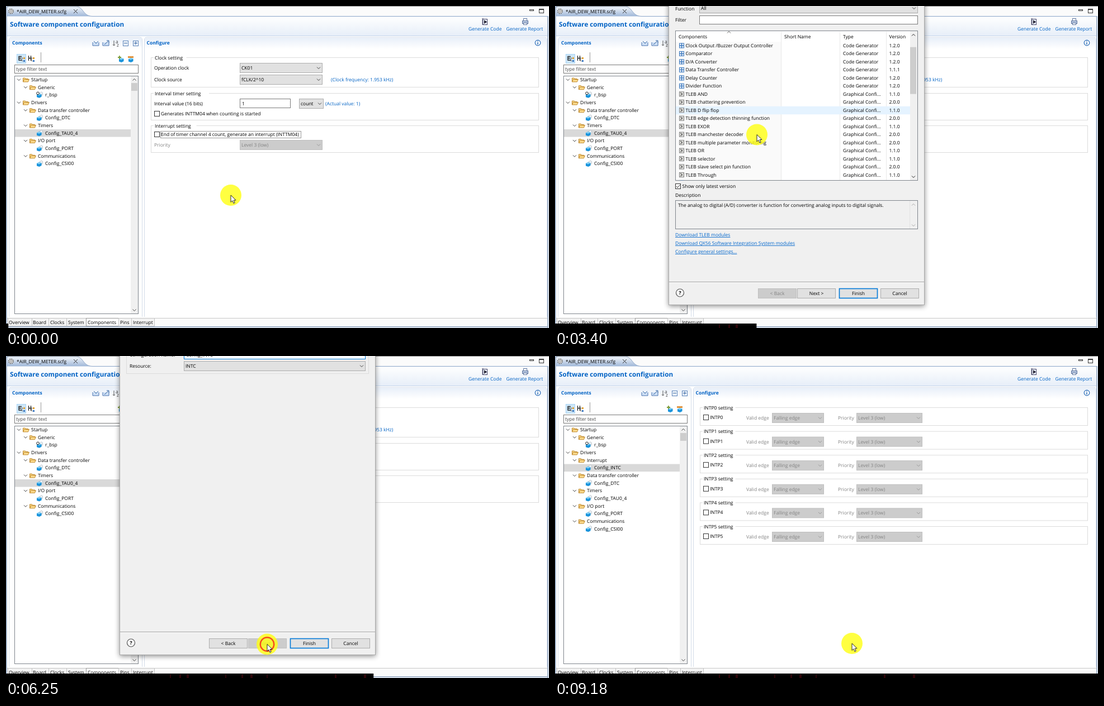
Recreate the animation shown at these times as an HTML page. Size 971 by 577 pixels, loop 9210 ms.

```html
<!DOCTYPE html>
<html lang="en">
<head>
<meta charset="utf-8">
<title>Component configuration</title>
<style>
html, body { margin: 0; width: 100%; height: 100%; overflow: hidden; background: #fff; }
svg { display: block; width: 971px; height: 577px; }
text { font: 8.5px "Open Sans", "Noto Sans", sans-serif; fill: #000; white-space: pre; text-rendering: geometricPrecision; }
.b { font-weight: 700; }
.h { font-size: 11.7px; font-weight: 700; }
.blue { fill: #0062c4; }
.gray { fill: #838383; }
.hint { fill: #444; }
.mid { text-anchor: middle; }
.link { fill: #0066cc; text-decoration: underline; }
.off text { fill: #a0a0a0; }
.shadow { filter: drop-shadow(0 2px 5px rgba(0,0,0,.45)); }
</style>
</head>
<body>
<svg id="stage" viewBox="0 0 971 577" xmlns="http://www.w3.org/2000/svg"></svg>
<script>
const LOOP = 9210, ROW = 14.47, LIST_TOP = 64;

// Drawing helpers. Text takes the middle height of its line.
const T = (x, y, s, c = '') => `<text x="${x}" y="${y + 3}" class="${c}">${s}</text>`;
const R = (x, y, w, h, fill, line, more = '') => {
  const o = line ? .5 : 0;
  return `<rect x="${x + o}" y="${y + o}" width="${w}" height="${h}" fill="${fill}" ${line ? `stroke="${line}"` : ''} ${more}/>`;
};
const P = (d, line, fill = 'none', w = 1) => `<path d="${d}" fill="${fill}" stroke="${line}" stroke-width="${w}"/>`;
const G = (id, s) => `<g id="${id}">${s}</g>`;
const at = (x, y, s) => `<g transform="translate(${x} ${y})">${s}</g>`;
const down = (x, y, c = '#444') => P(`M${x - 3} ${y - 1.5}l3 3 3-3`, c);
const up = (x, y, c = '#444') => P(`M${x - 3} ${y + 1.5}l3-3 3 3`, c);
const combo = (x, y, w, s, off) =>
  R(x, y - 9, w, 17, off ? '#ccc' : '#e1e1e1', off ? '#bfbfbf' : '#adadad') +
  T(x + 3, y, s, off ? 'gray' : '') + down(x + w - 6, y, off ? '#999' : '#444');
const check = (y, s) => R(265, y - 5, 9, 9, '#fff', '#333') + T(277, y, s);
const group = (y, h, s) =>
  R(259, y, 693, h, 'none', '#dcdcdc') + R(264, y - 3, s.length * 4.5, 7, '#fff') + T(266, y + .5, s);

// Small icons
const folder = P('M.5 8.5v-7h4l1 1.5h4v2M.5 8.5l2-4.5h9l-2 4.5z', '#b98328', '#fbd98a', .9);
const box = P('M0 5l4-2 4.500 1.500v4.500l-4 2-4.500-1.500z', 'none', '#1a94dc') + P('M0 5l4-2 4.500 1.500-4.500 2z', 'none', '#86d2f7');
const cube = P('M4 3l4.500-3 2 1.500v4l-2 1.500V4.500z', '#a9b4bc', '#eef2f5', .7) + box;
const squares = c => R(0, 0, 8, 8, '#e8eef8', c) + P('M4.5 0v9M0 4.5h9', c, 'none', 1.4);
const sheet = R(0, 0, 8, 8, '#f4f4f0', '#777') + P('M2 2.5h2v4h-2M7 2.5l-2 2 2 2', '#333');
const icons = { g: squares('#3b78bd'), m: squares('#c9772c'), e: sheet };
const plusBox = (x, plus) => R(x, 62, 9, 9, '#f5f9ff', '#5b83b8') + P(`M${x + 2} 66.500h6${plus ? `M${x + 5} 63.500v6` : ''}`, '#2c5f9e');
const tray = (x, d) => P(`M${x} 65v6h11v-6`, '#4a74b0', '#cfe0f5') + P(d, '#2c5f9e');
const hier = (x, d) => P(d, '#222', 'none', 1.3) + P(`M${x + 6.5} 92v6.500h2M${x + 6.5} 93.500h2`, '#777') +
  R(x + 9, 92, 3, 3, '#e0a030') + R(x + 9, 97, 3, 3, '#3c78c0');

const gradient = (id, a, b) =>
  `<linearGradient id="${id}" x2="0" y2="1"><stop stop-color="${a}"/><stop offset="1" stop-color="${b}"/></linearGradient>`;

function frameWindow() {
  const tabs = [['Overview', 3, 5], ['Board', 46, 48], ['Clocks', 76, 79], ['System', 108, 111],
    ['Components', 143, 146], ['Pins', 201, 204], ['Interrupt', 224, 227]];
  const ends = [...tabs.slice(1).map(t => t[1]), 265];
  return `<defs>${gradient('tab', '#f4f7fb', '#9fb7d8')}${gradient('head', '#fff', '#e6eef8')}${gradient('sect', '#e8eff9', '#fff')}
    <clipPath id="rows"><rect x="216" y="64" width="419" height="248.5"/></clipPath>
    <clipPath id="strip"><rect id="stripBox" y="569" width="4" height="8"/></clipPath></defs>` +
    R(0, 0, 971, 577, '#fff') + R(0, 0, 971, 18, '#fbfbfb') + R(0, 19, 971, 35, 'url(#head)') +
    P('M1 18.5V5q0-4 4-4h120c14 0 12 17.5 30 17.5z', 'none', 'url(#tab)') +
    P('M1 18.5V5q0-4 4-4h120c14 0 12 17.5 30 17.5H970', '#8ba5c8') +
    R(0, 0, 971, 1, '#8c8c8c') + R(0, 0, 2, 577, '#a3b4cb') + R(968, 18, 2, 559, '#a3b4cb') +
    `<circle cx="9" cy="9.5" r="4" fill="#eee" stroke="#777" stroke-width="2" stroke-dasharray="2 1.1"/>
     <circle cx="9" cy="9.5" r="1.6" fill="#fff" stroke="#777"/>` +
    T(19, 10, '*AIR_DEW_METER.scfg') + P('M121 6l7 7M128 6l-7 7', '#333') +
    R(936, 6, 7, 2, '#fff', '#333') + R(953, 5, 8, 7, '#fff', '#333') + R(953, 5, 9, 2, '#333') +
    T(7, 34, 'Software component configuration', 'h blue') +
    R(852, 23, 8, 10, '#eef3fa', '#446') + P('M851 23h3M851 26h3M851 29h3M851 32h3', '#446') + P('M855 25l5 3.5-5 3.5z', 'none', '#223') +
    R(923, 26, 10, 5, '#b4c4de', '#5f769f') + R(925, 22, 6, 4, '#fff', '#5f769f') + R(925, 30, 6, 3, '#fff', '#5f769f') +
    T(827, 41, 'Generate Code', 'blue') + T(894.5, 41, 'Generate Report', 'blue') +
    R(2, 53, 966, 1, '#c3d4ea') +
    [[5, 238], [247, 720]].map(([x, w]) => P(`M${x + .5} 557V60q0-4 4-4h${w - 8}q4 0 4 4V557`, '#d3dce9') +
      R(x + 1, 57, w - 1, 20, 'url(#sect)')).join('') +
    T(11, 66, 'Components', 'b blue') + T(251.5, 66, 'Configure', 'b blue') +
    `<circle cx="951" cy="66" r="4.8" fill="#fff" stroke="#2a6db8" stroke-width="1.2"/>` + P('M951 65v4M951 62.5v1.4', '#2a6db8', 'none', 1.5) +
    tray(155, 'M157 63l4 4 4-4') + tray(173, 'M176 69l7-6M180 62h4v4') +
    P('M193 62v9M191 69l2 2 2-2', '#555') + T(196, 64, 'a', 'hint') + T(198, 70, 'z', 'hint') +
    plusBox(209, false) + plusBox(227, true) +
    R(19, 86, 16, 16, '#cde6f9', '#a9d3f3') + hier(22, 'M28 90.500h-5v6.500h5M23 93.500h4') +
    hier(39, 'M40.500 89v9M40.500 93.500h4M44.500 89v9') + R(62, 83, 1, 18, '#999') +
    G('tools', at(202, 90, box) + P('M200 92h6M203 89v6', '#7d9a35', 'none', 1.8) +
      at(219, 90, box) + R(218, 90, 10, 3, '#e0913a')) +
    R(15, 105, 221, 15, '#fff', '#7a7a7a') + T(18, 113, 'type filter text', 'hint') +
    R(15, 125, 221, 426, '#fff', '#7f858c') + R(223, 126, 13, 425, '#f0f0f0') +
    up(229.5, 132) + down(229.5, 545) + R(224, 138, 11, 14, '#cdcdcd') +
    R(2, 559, 966, 16, '#fafafa') + R(2, 559, 966, 1, '#c8c8c8') +
    tabs.map(([s, x, tx], i) => R(x, 559, ends[i] - x, 14, i == 4 ? '#fff' : '#f3f3f3', i == 4 ? '#999' : '#c4c4c4') + T(tx, 567, s)).join('') +
    R(0, 574, 970, 2, '#a3b4cb');
}

// Marks: v open, > closed, - leaf, * selected leaf; the digit is the depth.
const tree = lines => lines.split('|').map((line, i) => {
  const y = 132 + 13.68 * i, mark = line[0];
  if (mark == '-' || mark == '*') {
    const s = line.slice(1);
    return (mark == '*' ? R(16, y - 6.8, 207, 13.6, '#d9d9d9') : '') + at(55, y - 5.5, cube) +
      (s == 'r_bsp' ? `<circle cx="57" cy="${y - 3}" r="2.3" fill="#fff" stroke="#222"/>` : '') + T(70, y, s);
  }
  const x = 12 * line[1];
  return (mark == 'v' ? down(x + 23, y) : P(`M${x + 22} ${y - 3}l3 3-3 3`, '#888')) +
    at(x + 30, y - 4.5, folder) + T(x + 45, y, line.slice(2));
}).join('');

const HEAD = 'v0Startup|v1Generic|-r_bsp|v0Drivers|';
const trees = [
  'v1Data transfer controller|-Config_DTC|v1Timers|*Config_TAU0_4|v1I/O port|-Config_PORT|v1Communications|-Config_CSI00',
  '>1Interrupt|v1Data transfer controller|*Config_TAU0_4|v1Timers|-Config_PORT|v1I/O port|-Config_CSI00|>1Communications',
  'v1Interrupt|*Config_INTC|v1Data transfer controller|-Config_DTC|v1Timers|-Config_TAU0_4|v1I/O port|-Config_PORT|v1Communications|-Config_CSI00'
];

const timerForm = () =>
  group(92, 53, 'Clock setting') + T(265, 111, 'Operation clock') + combo(418, 111, 147, 'CK01') +
  T(265, 132, 'Clock source') + combo(418, 132, 147, 'fCLK/2^10') + T(581, 132, '(Clock frequency: 1.953 kHz)', 'blue') +
  group(156, 48, 'Interval timer setting') + T(265, 175, 'Interval value (16 bits)') +
  R(418, 166, 90, 16, '#fff', '#7a7a7a') + T(422, 175, '1') + combo(524, 175, 43, 'count') + T(571, 175, '(Actual value: 1)', 'blue') +
  check(193, 'Generates INTTM04 when counting is started') +
  group(214, 48, 'Interrupt setting') + check(230, 'End of timer channel 4 count, generate an interrupt (INTTM04)') +
  R(276, 224, 251, 12, 'none', '#333', 'stroke-dasharray="1 1"') +
  T(265, 249, 'Priority', 'gray') + combo(418, 249, 147, 'Level 3 (low)', true);

const interruptForm = () => [0, 1, 2, 3, 4, 5].map(n => at(0, n * 42.6,
  group(92, 32, `INTP${n} setting`) + check(110, 'INTP' + n) + T(342, 111, 'Valid edge', 'gray') +
  combo(388, 111, 92, 'Falling edge', true) + T(506, 111, 'Priority', 'gray') + combo(539, 111, 117, 'Level 3 (low)', true))).join('');

// name | type | version | short name
const parts = `A/D Converter|g|1.2.0
Board Support Package|m|1.62|r_bsp
Clock Accuracy Check|g|1.1.0
Clock Output /Buzzer Output Controller|g|1.2.0
Comparator|g|1.2.0
D/A Converter|g|1.2.0
Data Transfer Controller|g|1.1.1
Delay Counter|g|1.2.0
Divider Function|g|1.2.0
TLEB AND|e|1.1.0
TLEB chattering prevention|e|2.0.0
TLEB D flip flop|e|1.1.0
TLEB edge detection thinning function|e|2.0.0
TLEB EXOR|e|1.1.0
TLEB manchester decoder|e|2.0.0
TLEB multiple parameter monitoring|e|2.0.0
TLEB OR|e|1.1.0
TLEB selector|e|1.1.0
TLEB slave select pin function|e|2.0.0
TLEB Through|e|1.1.0
External Event Counter|g|1.2.0
TK4021 Sensor Middleware|m|1.00|r_tk4021
TK5037 Sensor Middleware|m|1.10|r_tk5037
TK6000 Sensor Middleware|m|1.00|r_tk6000
VD610x Sensor Middleware|m|1.22|r_vd610x
VD720x Sensor Middleware|m|1.00|r_vd720x
IIC Communication (Master mode)|g|1.3.0
IIC Communication (Slave mode)|g|1.2.0
IIC Communication Driver Interface Mid...|m|1.10|r_comms_i2c
Input Pulse Interval/Period Measurement|g|1.2.0
Input Signal High-/Low-Level Width Me...|g|1.2.0
Interrupt Controller|g|1.2.0
Interval Timer|g|1.2.0
Key Interrupt|g|1.1.1
PJ4608 Sensor Middleware|m|1.01|r_pj4608
Ports|g|1.2.0`.split('\n');
const types = { g: 'Code Generator', e: 'Graphical Confi...', m: 'QX56 Software I...' };

const partRow = (line, i) => {
  const [name, type, version, short = ''] = line.split('|'), y = 71 + ROW * i;
  return at(222, y - 4.5, icons[type]) + T(233.5, y, name) + T(410, y, short) + T(515, y, types[type]) + T(597.5, y, version);
};

const button = (id, x, s) => G(id, R(x, 506, 68, 17, '#e1e1e1', '#adadad') + T(x + 34.5, 515, s, 'mid'));

const listPage = () =>
  T(215, 5, 'Function') + combo(258, 4, 390, 'All') + T(215, 25, 'Filter') + R(258, 17, 390, 15, '#fff', '#7a7a7a') +
  R(215, 44, 433, 268, '#fff', '#7f858c') + R(216, 64, 188, 248, '#fafafa') +
  [404, 509, 592].map(x => R(x, 46, 1, 266, '#e8e8e8')).join('') + up(311, 47, '#555') +
  T(221, 55, 'Components') + T(410, 55, 'Short Name') + T(515, 55, 'Type') + T(597.5, 55, 'Version') +
  `<g clip-path="url(#rows)"><g id="list">${R(216, 0, 419, ROW, '#d9d9d9', '', 'id="picked"')}${R(216, 0, 419, ROW, '#e5f3ff', '', 'id="hover"')}${parts.map(partRow).join('')}</g></g>` +
  R(635, 45, 13, 267, '#f0f0f0') + up(641, 52, '#222') + down(641, 306, '#222') + R(635, 58, 11, 84, '#cdcdcd', '', 'id="thumb"') +
  R(215, 318, 9, 9, '#fff', '#333') + P('M217 323l2 2.500 4.500-5', '#222') + T(227.5, 323, 'Show only latest version') +
  T(215, 339, 'Description') + R(215, 348, 433, 51, '#f0f0f0', '#7f858c') + R(634, 349, 1, 50, '#e2e2e2') +
  up(641, 356, '#aaa') + down(641, 393, '#aaa') +
  G('aboutA', T(220, 357, 'The analog to digital (A/D) converter is function for converting analog inputs to digital signals.')) +
  G('aboutB', T(220, 357, 'The interrupt controller is function for handling interrupt requests from pins.')) +
  T(215, 410, 'Download TLEB modules', 'link') + T(215, 425, 'Download QX56 Software Integration System modules', 'link') +
  T(215, 440, 'Configure general settings...', 'link');

const namePage = () =>
  R(215, -20, 433, 51, 'none', '#dcdcdc') + T(221, -2, 'Configuration name:') +
  R(318, -12, 324, 17, '#fff', '#0078d7', 'id="nameBox"') + T(322, -2, 'Config_INTC') +
  T(221, 18, 'Resource:');

const dialog = () =>
  R(203, -20, 457, 555, '#f0f0f0', '#a8a8a8', 'class="shadow"') + G('pageA', listPage()) +
  G('pageB', G('labels', namePage()) + combo(318, 18, 324, 'INTC')) +
  R(204, 494, 456, 1, '#a0a0a0') + R(204, 495, 456, 1, '#fff') +
  `<circle cx="223.500" cy="514" r="7" fill="#f6f6f6" stroke="#555" stroke-width="1.2"/>` + T(223.5, 514, '?', 'b mid') +
  button('back', 363, '&lt; Back') + button('next', 433, 'Next &gt;') + button('finish', 508, 'Finish') + button('cancel', 582, 'Cancel');

const pointer =
  G('halo', `<circle r="19" fill="#ffff12" fill-opacity=".8"/>`) +
  G('ring', `<circle r="12.2" fill="none" stroke="#f8491c" stroke-width="2.500"/>`) +
  G('arrow', P('M0 0v12.500l2.900-2.700 2 4.700 2.200-.9-2-4.600h4z', '#111', '#fff', .9)) +
  G('hand', P('M-1.500 0q1.500-1.800 3 0v5l6 1.200q1.200.4 1 2l-1 4.300v2.500h-6.500v-2l-4.500-5q.3-1.800 2-1z', '#111', '#fff', .9) +
    P('M3.500 5.500v3M6 6v2.500', '#111', 'none', .7));

const strip = `<g clip-path="url(#strip)">${R(0, 569, 971, 8, '#000')}` +
  [293, 310, 323, 392, 421, 437, 466, 588, 640].map((x, i) => R(x, 570, 2 + i % 3, 7, '#2e0308')).join('') + '</g>';

document.getElementById('stage').innerHTML = frameWindow() +
  trees.map((s, i) => G('tree' + i, tree(HEAD + s))).join('') +
  G('formA', timerForm()) + G('formB', interruptForm()) + G('dialog', dialog()) + strip + pointer;

const el = id => document.getElementById(id);
const show = (id, on) => { el(id).style.display = on ? '' : 'none'; };
const within = (t, a, b) => t >= a && t < b;
const place = (id, [x, y]) => el(id).setAttribute('transform', `translate(${x} ${y})`);
const paint = (id, fill, line, w = 1) => {
  const r = el(id).firstChild;
  r.setAttribute('fill', fill);
  r.setAttribute('stroke', line);
  r.setAttribute('stroke-width', w);
};

const path = [[0, 402, 339], [200, 402, 339], [1300, 206, 95], [2500, 206, 95], [2860, 222, 108], [3260, 361, 230.5],
  [4300, 361, 230.5], [4560, 336, 300], [4720, 310, 268], [4820, 301, 259], [5150, 301, 259], [5650, 467, 516.5],
  [6500, 467, 516.5], [7150, 546.5, 518.5], [7750, 546.5, 518.5], [8400, 531, 515], [LOOP, 531, 515]];
const clicks = [[1340, 1510], [4960, 5130], [6080, 6400], [7400, 7720]];
const wheel = [3340, 3540, 3700, 3900, 4060, 4220];

function pos(t) {
  t = Math.max(t, 0);
  const i = path.findIndex(p => p[0] > t), [t0, x0, y0] = path[i - 1], [t1, x1, y1] = path[i];
  const u = (t - t0) / (t1 - t0), k = u * u * (3 - 2 * u);
  return [x0 + (x1 - x0) * k, y0 + (y1 - y0) * k];
}
const scroll = t => 3 * wheel.filter(w => w <= t).length;

const marks = [0, 40, 970, 1930, 2890, 3840, 4770, 5710, 6680, 7630, 8580, 9180, LOOP];
const steps = [0, 1, 24, 48, 72, 95, 118, 141, 165, 189, 213, 228, 229];
function progress(t) {
  t = Math.min(t + 22, LOOP - 1);
  const i = marks.findIndex(m => m > t), u = (t - marks[i - 1]) / (marks[i] - marks[i - 1]);
  return (Math.floor(steps[i - 1] + u * (steps[i] - steps[i - 1])) + 1) / 229;
}

function draw(t) {
  const tip = pos(t);
  el('stripBox').setAttribute('width', 971 * progress(t));
  place('arrow', tip);
  place('hand', tip);
  place('halo', pos(t - 40));
  place('ring', tip);
  const hand = within(t, 1150, 2600);
  show('hand', hand);
  show('arrow', !hand);
  show('ring', clicks.some(c => within(t, ...c)));

  el('tools').style.opacity = within(t, 1500, 2200) ? .35 : 1;
  show('tree0', t < 7500);
  show('tree1', within(t, 7500, 7750));
  show('tree2', t >= 7750);
  show('formA', t < 8100);
  show('formB', t >= 8100);

  show('dialog', within(t, 2200, 7950));
  el('dialog').style.opacity = Math.min(1, Math.max(0, (t - 2200) / 150));
  const second = t >= 6200, picked = t >= 4980, done = t >= 7450;
  show('pageA', !second);
  show('pageB', second);
  show('aboutA', !picked);
  show('aboutB', picked);

  const off = scroll(t), under = Math.floor((tip[1] - LIST_TOP) / ROW) + scroll(t - 90);
  place('list', [0, -off * ROW]);
  el('thumb').setAttribute('y', 58.5 + 5.05 * off);
  el('hover').setAttribute('y', LIST_TOP + under * ROW);
  show('hover', t > 2860 && tip[0] > 216 && within(tip[1], LIST_TOP, 312) && !(picked && under == 31));
  el('picked').setAttribute('y', LIST_TOP + (picked ? 31 : 0) * ROW);
  el('picked').setAttribute('fill', picked ? '#cce8ff' : '#d9d9d9');

  el('labels').setAttribute('class', done ? 'off' : '');
  el('nameBox').setAttribute('stroke', done ? '#ccc' : '#0078d7');
  const plain = ['#e1e1e1', '#adadad'], dead = ['#ccc', '#bfbfbf'], hot = ['#e5f1fb', '#0078d7'];
  paint('back', ...(second ? plain : dead));
  paint('next', ...(second ? dead : t > 5560 ? hot : plain));
  paint('finish', t >= 7400 ? '#cce4f7' : t > 6900 ? '#e5f1fb' : '#e1e1e1', '#0078d7', t >= 7400 ? 1 : 1.6);
  el('back').lastChild.classList.toggle('gray', !second);
  el('next').lastChild.classList.toggle('gray', second);
}

const start = performance.now();
function tick() {
  draw((performance.now() - start) % LOOP);
  requestAnimationFrame(tick);
}
tick();
</script>
</body>
</html>
```
